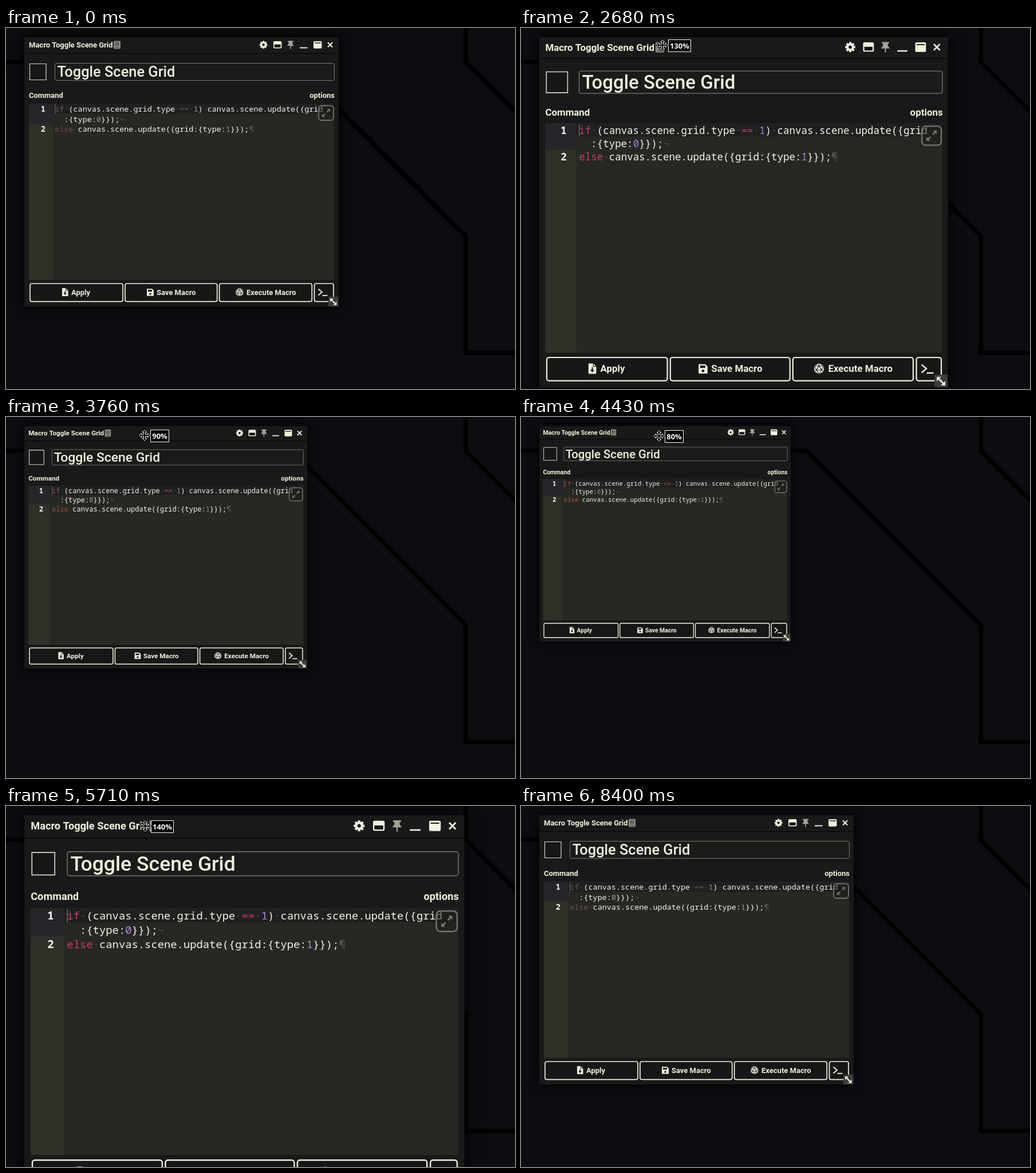
Write an HTML page with a canvas that moves like this. It is 889x630 px and loops after 8860 ms.

```html
<!DOCTYPE html>
<html lang="en">
<head>
<meta charset="utf-8">
<title>Macro window zoom</title>
<style>
  html, body { margin: 0; width: 100%; height: 100%; overflow: hidden; background: #0d0c11; }
  canvas { display: block; width: 889px; height: 630px; }
</style>
</head>
<body>
<canvas id="stage" width="889" height="630"></canvas>
<script>
const ctx = document.getElementById('stage').getContext('2d');
const LOOP = 8860, STEP = 70;
const INK = '#f0f0e0', PANEL = '#191919', DIM = '#53534c';
const UI = 'Roboto, "Open Sans", sans-serif';
const MONO = '"Noto Sans Mono", "DejaVu Sans Mono", monospace';
const ORIGIN = { x: 32, y: 16 };

// [time in ms, zoom in percent], held until the next entry
const ZOOM = [
  [0, 100], [2410, 110], [2540, 120], [2670, 130], [2880, 140],
  [3210, 130], [3350, 120], [3480, 110], [3550, 100], [3690, 90], [3830, 80],
  [4030, 70], [4430, 80], [4500, 90], [4630, 100], [4700, 110], [4830, 120],
  [4960, 130], [5100, 140], [5170, 150], [5240, 160],
  [5640, 150], [5710, 140], [5780, 130], [5850, 120], [5920, 110], [6050, 100],
  [7130, 110], [7590, 100]
];

// [zoom, keyword rgb, number rgb]
const SYNTAX = [
  [80, [168, 82, 80], [140, 132, 126]],
  [100, [112, 80, 86], [150, 145, 150]],
  [120, [168, 72, 106], [154, 124, 198]],
  [140, [204, 60, 108], [170, 134, 232]]
];

const lerp = (a, b, k) => a + (b - a) * k;
const clamp = v => Math.min(1, Math.max(0, v));
const within = (t, a, b) => t >= a && t < b;

function box(x, y, w, h, r, fill, stroke, width = 1) {
  ctx.beginPath();
  ctx.roundRect(x, y, w, h, r);
  if (fill) { ctx.fillStyle = fill; ctx.fill(); }
  if (stroke) { ctx.strokeStyle = stroke; ctx.lineWidth = width; ctx.stroke(); }
}

function trace(points) {
  ctx.beginPath();
  points.forEach(([x, y], i) => i ? ctx.lineTo(x, y) : ctx.moveTo(x, y));
}

function line(points, color, width) {
  trace(points);
  ctx.strokeStyle = color;
  ctx.lineWidth = width;
  ctx.stroke();
}

function poly(points, color) {
  trace(points);
  ctx.closePath();
  ctx.fillStyle = color;
  ctx.fill();
}

function disc(x, y, r, color) {
  ctx.beginPath();
  ctx.arc(x, y, r, 0, Math.PI * 2);
  ctx.fillStyle = color;
  ctx.fill();
}

function text(str, x, y, font, color = INK, align = 'left') {
  ctx.font = font;
  ctx.fillStyle = color;
  ctx.textAlign = align;
  ctx.fillText(str, x, y);
}

const label = (str, x, y, align) => text(str, x, y, '700 13px ' + UI, INK, align);

function syntaxColors(zoom) {
  const z = Math.min(140, Math.max(80, zoom));
  const i = Math.min(2, Math.floor((z - 80) / 20));
  const [a, b] = [SYNTAX[i], SYNTAX[i + 1]];
  const k = (z - a[0]) / 20;
  return [1, 2].map(n => `rgb(${a[n].map((v, c) => Math.round(lerp(v, b[n][c], k)))})`);
}

function background() {
  ctx.fillStyle = '#0d0c11';
  ctx.fillRect(0, 0, 889, 630);
  ctx.lineJoin = 'miter';
  line([[0, 59], [499, 59], [803, 363], [803, 567], [889, 567]], '#000', 8);
  line([[803, 0], [803, 59], [893, 149]], '#000', 8);
}

function gear(x, y) {
  for (let i = 0; i < 4; i++) {
    const a = i * Math.PI / 4, c = Math.cos(a) * 6.8, s = Math.sin(a) * 6.8;
    line([[x - c, y - s], [x + c, y + s]], INK, 3);
  }
  disc(x, y, 5.2, INK);
  disc(x, y, 2.2, PANEL);
}

function headerIcons() {
  box(188, 22.5, 12, 14, 2, '#85857d');
  ctx.beginPath();
  ctx.arc(194, 28, 3, 0, Math.PI * 2);
  ctx.moveTo(191, 28);
  ctx.lineTo(197, 28);
  ctx.strokeStyle = '#3c3c38';
  ctx.lineWidth = 0.9;
  ctx.stroke();
  line([[191, 34], [197, 34]], '#3c3c38', 1);

  gear(449.7, 29.3);

  box(467, 23, 14.5, 12.5, 2, INK);
  box(468.7, 28.8, 11, 5, 0.5, '#111');

  const pin = '#a3a39a';
  box(492, 22.5, 10, 2.2, 1, pin);
  poly([[494, 24], [500, 24], [500.5, 28], [503, 31.2], [491, 31.2], [493.5, 28]], pin);
  line([[497, 31], [497, 36.5]], pin, 1.6);

  line([[513, 34.5], [526.5, 34.5]], INK, 1.9);

  box(537, 23, 14.5, 12.8, 2, INK);
  line([[538.8, 26], [549.7, 26]], '#222', 1.5);

  line([[562, 25.3], [570.2, 33.5]], INK, 2);
  line([[570.2, 25.3], [562, 33.5]], INK, 2);
}

function editor(zoom) {
  const [keyword, number] = syntaxColors(zoom);
  const font = '500 13.46px ' + MONO;
  box(40, 132, 533.5, 307.5, 0, '#272822');
  box(40, 132, 41.5, 307.5, 0, '#2f3129');
  box(40, 132, 41.5, 35.5, 0, '#26262a');
  box(81.5, 132, 492, 17.7, 0, '#202020');

  text('1', 68.8, 146, '600 13.46px ' + MONO, '#f8f8f2', 'right');
  text('2', 68.8, 181.4, '600 13.46px ' + MONO, '#f8f8f2', 'right');

  const put = (row, col, str, color = '#f4f4ea') =>
    text(str, 85.2 + col * 8.076, 146 + row * 17.7, font, color);
  put(0, 0, 'if', keyword);
  put(0, 2, '·', DIM);
  put(0, 3, '(canvas.scene.grid.type');
  put(0, 26, '·', DIM);
  put(0, 27, '==', keyword);
  put(0, 29, '·', DIM);
  put(0, 30, '1', number);
  put(0, 31, ')');
  put(0, 32, '·', DIM);
  put(0, 33, 'canvas.scene.update({grid');
  put(1, 2, ':{type:');
  put(1, 9, '0', number);
  put(1, 10, '}});');
  put(1, 14, '¬', DIM);
  put(2, 0, 'else', keyword);
  put(2, 4, '·', DIM);
  put(2, 5, 'canvas.scene.update({grid:{type:');
  put(2, 37, '1', number);
  put(2, 38, '}});');
  put(2, 42, '¶', DIM);
  line([[85.6, 133], [85.6, 149.5]], '#77776f', 1);

  // expand button
  const gray = '#72726c';
  box(546, 135.5, 26, 25.5, 5, 'rgba(30,30,28,.55)', gray, 1.8);
  for (const d of [1, -1]) {
    const at = (x, y) => [559 + x * d, 148.3 + y * d];
    line([at(1.5, -1.5), at(5, -5)], gray, 2.2);
    poly([at(1.8, -7), at(7, -7), at(7, -1.8)], gray);
  }
}

function buttonIcons() {
  // document with arrow
  poly([[98, 454], [104.5, 454], [108.5, 458], [108.5, 468], [98, 468]], INK);
  line([[104.5, 454], [104.5, 458], [108.5, 458]], PANEL, 0.9);
  line([[103.2, 459.2], [103.2, 464]], PANEL, 1.6);
  poly([[100.3, 462.5], [106.1, 462.5], [103.2, 466]], PANEL);

  // floppy disk
  poly([[246, 455], [255, 455], [258, 458], [258, 467.5], [246, 467.5]], INK);
  box(248, 456.8, 7, 3.2, 0, PANEL);
  disc(252, 464, 1.8, PANEL);

  // twenty-sided die
  const [x, y] = [407.8, 461];
  const ring = (r, n, start) => Array.from({ length: n }, (_, i) => {
    const a = start + i * Math.PI * 2 / n;
    return [x + Math.cos(a) * r, y + Math.sin(a) * r];
  });
  const outer = ring(7.3, 6, -Math.PI / 2), inner = ring(3.9, 3, -Math.PI / 2);
  poly(outer, INK);
  line([...inner, inner[0]], PANEL, 0.9);
  inner.forEach((p, i) => [5, 0, 1].forEach(k => line([p, outer[(i * 2 + k) % 6]], PANEL, 0.8)));

  // prompt
  line([[545.5, 455.5], [552, 461], [545.5, 466.5]], INK, 1.9);
  line([[552.5, 466.8], [561.5, 466.8]], INK, 1.9);
}

function resizeHandle() {
  box(563, 469, 17.5, 17, 0, '#3d3d3b');
  line([[568, 474], [575.5, 481.5]], INK, 2.2);
  poly([[566, 472], [572, 472], [566, 478]], INK);
  poly([[577.5, 483.5], [571.5, 483.5], [577.5, 477.5]], INK);
}

function macroWindow(zoom) {
  const s = zoom / 100;
  ctx.save();
  ctx.translate(ORIGIN.x, ORIGIN.y);
  ctx.scale(s, s);
  ctx.translate(-ORIGIN.x, -ORIGIN.y);

  ctx.shadowColor = '#000';
  ctx.shadowBlur = 18 * s;
  box(32, 16, 549, 470, 0, PANEL);
  ctx.shadowBlur = 0;
  ctx.shadowColor = 'transparent';
  line([[32, 44.5], [581, 44.5]], '#020202', 1);

  label('Macro Toggle Scene Grid', 40, 34.2);
  headerIcons();

  box(41.5, 62.5, 28.5, 28, 0, '#171717', '#d8d8ca', 1.2);
  box(85.5, 61.5, 488, 30, 3, '#1b1b1a', '#7a7971', 1);
  text('Toggle Scene Grid', 89.5, 85.4, '500 25.4px ' + UI);
  label('Command', 40, 121.5);
  label('options', 574, 121.5, 'right');

  editor(zoom);

  for (const [x, w] of [[42, 162], [208, 160.7], [372.7, 161.6], [538.6, 33.4]])
    box(x, 446, w, 31.3, 3, '#171717', INK, 1.7);
  label('Apply', 114, 465.5);
  label('Save Macro', 263, 465.5);
  label('Execute Macro', 420, 465.5);
  buttonIcons();
  resizeHandle();
  ctx.restore();
}

function moveCursor(x, y) {
  const arm = [[-1.5, -1.5], [-1.5, -5.5], [-4, -5.5], [0, -9.3], [4, -5.5], [1.5, -5.5]];
  const points = [];
  for (let i = 0, turn = ([a, b]) => [a, b]; i < 4; i++) {
    points.push(...arm.map(turn).map(([a, b]) => [x + a, y + b]));
    const last = turn;
    turn = p => { const [a, b] = last(p); return [-b, a]; };
  }
  points.push(points[0]);
  line(points, '#000', 2.6);
  poly(points, '#000');
  line(points, '#fff', 1);
}

function arrowCursor(x, y) {
  const points = [[0, 0], [0, 16], [3.7, 12.6], [6.3, 18.5], [8.8, 17.4], [6.2, 11.7], [11.3, 11.7], [0, 0]]
    .map(([a, b]) => [x + a, y + b]);
  poly(points, '#fff');
  line(points, '#000', 1);
}

function zoomLabel(zoom, x, y) {
  const str = zoom + '%';
  const w = str.length > 3 ? 39 : 32;
  box(x + 10.5, y - 9.5, w, 21, 0, '#000', '#fff', 1);
  text(str, x + 10.5 + w / 2, y + 5.5, '700 13px "Open Sans", "Noto Sans", sans-serif', '#fff', 'center');
}

// Pointer position, or null while it is off the stage
function pointer(t) {
  if (t < 130 || t >= 8400) return null;
  if (t < 690) {
    const k = 1 - (1 - Math.floor((t - 130) / STEP) / 7) ** 2;
    return [lerp(763, 247, k), lerp(540, 30, k)];
  }
  if (t >= 8050) {
    const k = ((Math.floor((t - 8050) / STEP) + 1) / 5) ** 1.7;
    return [lerp(243, 797, k), lerp(35, 589, k)];
  }
  const a = clamp((t - 3480) / 350), b = clamp((t - 4500) / 600);
  return [Math.round(247 - 6 * a + 2 * b), Math.round(30 + 3 * a + 2 * b)];
}

function draw(t) {
  const zoom = ZOOM.filter(([at]) => at <= t).pop()[1];
  background();
  macroWindow(zoom);

  const p = pointer(t);
  if (!p) return;
  if (within(t, 2410, 6600) || within(t, 7130, 7720)) zoomLabel(zoom, ...p);
  (p[1] < 45 ? moveCursor : arrowCursor)(...p);
  if (within(t, 1880, 1950)) disc(247, 29.5, 11.8, 'rgba(250,244,16,.7)');
}

const start = performance.now();
function tick() {
  draw((performance.now() - start) % LOOP);
  requestAnimationFrame(tick);
}
tick();
</script>
</body>
</html>
```
